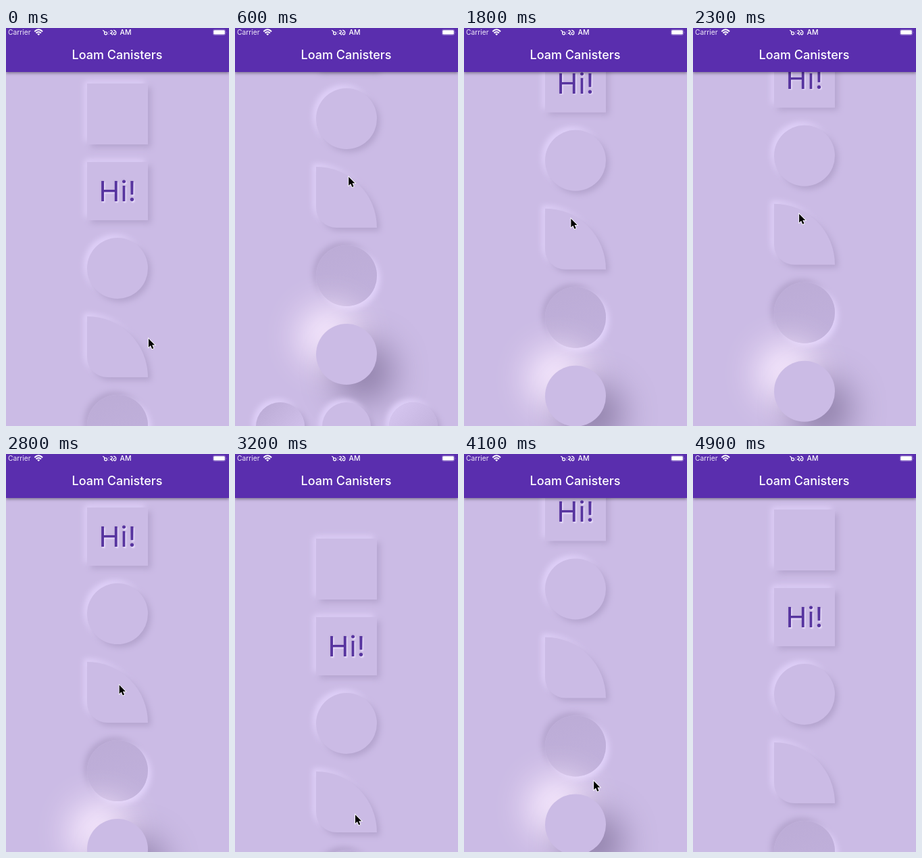
Animation of 330x588 px, one loop 7300 ms. Source, as an HTML page:

```html
<!DOCTYPE html>
<html lang="en">
<head>
<meta charset="utf-8">
<title>Loam Canisters</title>
<style>
  html, body { margin: 0; width: 100%; height: 100%; overflow: hidden; background: #cbbbe5; }
  body { font-family: Inter, Roboto, sans-serif; }
  #stage { position: relative; width: 330px; height: 588px; overflow: hidden; background: #cbbbe5; }
  #list {
    position: absolute; left: 0; top: 82px; width: 330px;
    display: flex; flex-direction: column; align-items: center; gap: 26px;
  }
  .row { display: flex; gap: 26.5px; }
  .clay {
    --light: #e1d2fa; --dark: #b4a4ce; --off: 4.5px; --blur: 9px;
    width: 90px; height: 90px; background: #cbbbe5;
    box-shadow:
      var(--off) var(--off) var(--blur) var(--dark),
      calc(-1 * var(--off)) calc(-1 * var(--off)) var(--blur) var(--light);
  }
  .round { border-radius: 50%; }
  .leaf { border-radius: 0 90px 0 30px; }
  .sunk { --light: #b4a4ce; --dark: #e1d2fa; background: linear-gradient(160deg, #bcacd6, #c1b1dc); }
  .halo { --light: #faecff; --dark: #9080aa; --off: 26px; --blur: 50px; }
  .row .clay { width: 72px; height: 72px; }
  .concave { background: linear-gradient(135deg, #b9a9d3, #d8c8f2); }
  .convex { background: linear-gradient(135deg, #d8c8f2, #bbabd5); }
  .hi {
    height: 86px; line-height: 87px; text-align: center;
    font-size: 41.5px; letter-spacing: 1px; text-indent: 1px; color: #57349f;
    text-shadow: 1.5px 1.5px 2px #eadffc, -1px -1px 2px #c0b0da;
  }
  #bar {
    position: absolute; left: 0; top: 0; width: 330px; height: 64.5px;
    background: #5a2eae; box-shadow: 0 2px 4px rgba(0, 0, 0, .36);
  }
  svg { position: absolute; left: 0; top: 0; }
</style>
</head>
<body>
<div id="stage">
  <div id="list">
    <div class="clay"></div>
    <div class="clay hi">Hi!</div>
    <div class="clay round"></div>
    <div class="clay leaf"></div>
    <div class="clay round sunk"></div>
    <div class="clay round halo"></div>
    <div class="row">
      <div class="clay round concave"></div>
      <div class="clay round"></div>
      <div class="clay round convex"></div>
    </div>
  </div>
  <div id="bar">
    <svg width="330" height="64" fill="#fff">
      <text x="3" y="10" font-size="10.3" fill="#eee8f8">Carrier</text>
      <!-- wifi -->
      <path fill="none" stroke="#fff" stroke-width="1.9" d="M42.3 5.2Q48.2-.6 54.1 5.2M44.5 7.5Q48.2 4 51.9 7.5"/>
      <path d="M46.1 8.8Q48.2 7 50.3 8.8L48.2 11Z"/>
      <!-- clock digits in Bengali numerals -->
      <path fill="none" stroke="#fff" stroke-width="1.2" stroke-linecap="round" stroke-linejoin="round"
        d="M143.6 3.6l2 1.3v2.9q0 2 2 2t2-2-2-2-2 1.5M152 5.8v0M152 9v0M154.4 4q3-.9 3 1t-3 2.8q1.4 0 3.2 2.2M159.6 3.4q3.2.6 3.2 3.6t-1.9 2.8-1.9-1.8 1.6-1.4"/>
      <text x="185.5" y="10" font-size="10.5" font-weight="500" text-anchor="end">AM</text>
      <!-- battery -->
      <rect x="306.3" y="2.3" width="18.4" height="8.2" rx="2.2" fill="none" stroke="#9a7fd0" stroke-width=".7"/>
      <rect x="307.2" y="3.2" width="16.6" height="6.4" rx="1.4"/>
      <path d="M325.6 5q1.5 1.5 0 3Z" fill="#9a7fd0"/>
      <text x="164.5" y="46" font-size="18" font-weight="500" text-anchor="middle">Loam Canisters</text>
    </svg>
  </div>
  <svg id="cursor" width="16" height="22" overflow="visible">
    <path transform="scale(.9)" d="M0 0V14.2L3.3 11.2 5.7 16.8 8.2 15.7 5.8 10.3H10.2Z" stroke="#fff" stroke-width="1.8" paint-order="stroke"/>
  </svg>
</div>
<script>
const LOOP = 7300, STEP = 100, END = 4800;

// Turning points of the hand: [time, scroll, pointer x, pointer y]
const turns = [
  [0, 0, 211, 459],
  [1000, 341, 145, 90],
  [1400, 298, 171, 203],
  [1550, 298, 170, 143],
  [2000, 60, 150, 381],
  [2500, 224, 161, 217],
  [3200, -43, 178, 533],
  [3840, 298, 185, 373],
  [4400, -21, 201, 620],
  [END, 0, 201, 620],
];

const ease = u => u * u * (3 - 2 * u);

// Swing smoothly from one turning point to the next
function poseAt(t) {
  const i = Math.max(1, turns.findIndex(turn => turn[0] >= t));
  const from = turns[i - 1], to = turns[i];
  const u = ease((t - from[0]) / (to[0] - from[0]));
  return from.map((v, k) => v + (to[k] - v) * u);
}

const list = document.getElementById('list');
const cursor = document.getElementById('cursor');
const start = performance.now();

function draw() {
  const now = Math.max(0, performance.now() - start) % LOOP;
  const [, scroll, x, y] = poseAt(Math.min(END, Math.floor(now / STEP) * STEP));
  list.style.transform = `translateY(${-scroll}px)`;
  cursor.style.transform = `translate(${x}px, ${y}px)`;
  requestAnimationFrame(draw);
}
draw();
</script>
</body>
</html>
```
